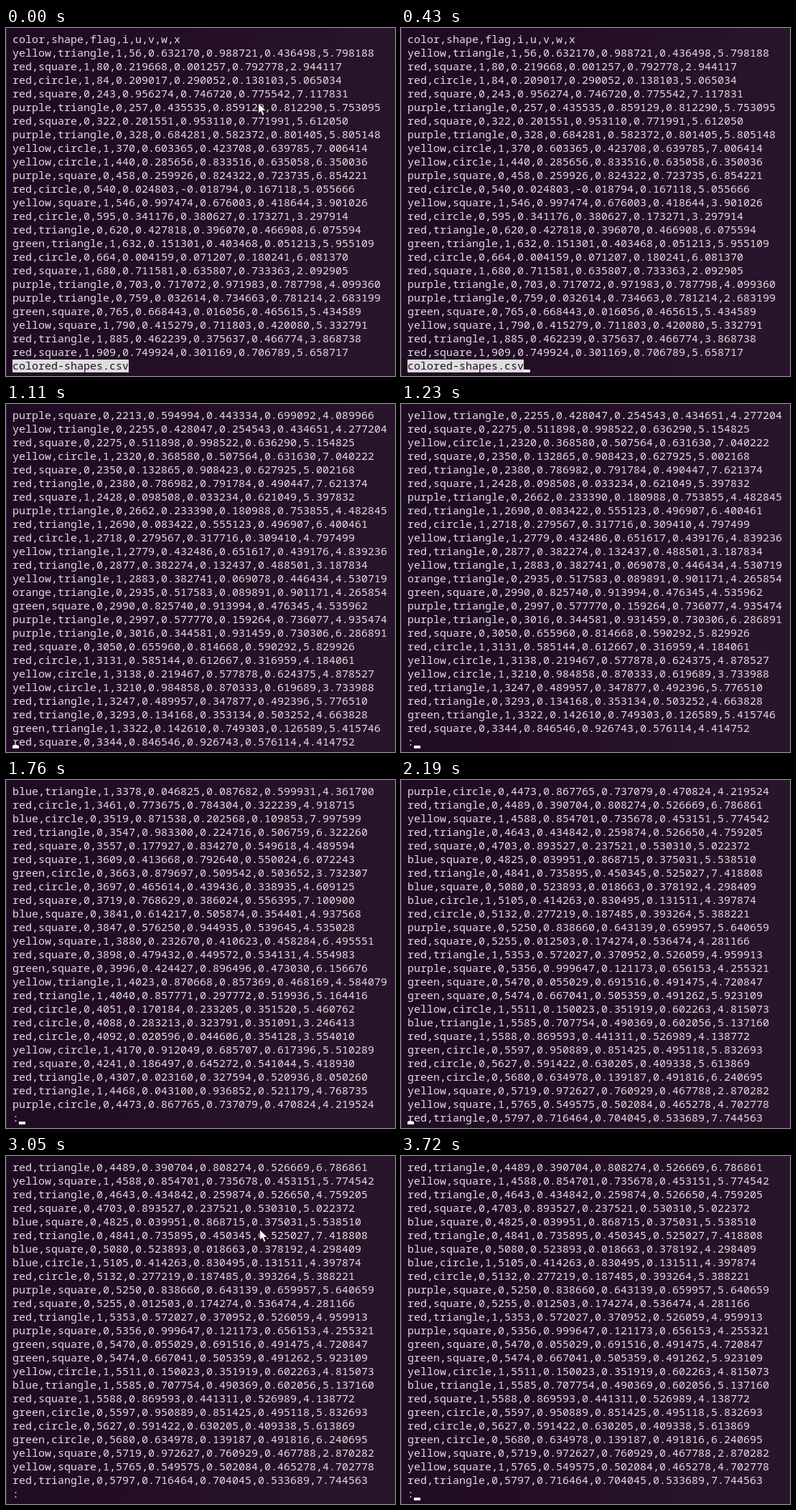
Animation of 542x486 px, one loop 3940 ms. Source, as an HTML page:

```html
<!DOCTYPE html>
<html lang="en">
<head>
<meta charset="utf-8">
<title>Paging through a CSV file</title>
<style>
html, body { margin: 0; width: 100%; height: 100%; overflow: hidden; background: #230f27; }
svg { display: block; }
text { font: 500 15px "Noto Sans Mono", "DejaVu Sans Mono", monospace; font-variant-ligatures: none; fill: #dedede; white-space: pre; }
#status.mark { fill: #210d25; }
</style>
</head>
<body>
<svg width="542" height="486" viewBox="0 0 542 486">
  <defs>
    <linearGradient id="bg" x2="1" y2="0.15">
      <stop offset="0" stop-color="#1e0a22"/>
      <stop offset="0.5" stop-color="#230e26"/>
      <stop offset="1" stop-color="#29152b"/>
    </linearGradient>
  </defs>
  <rect width="542" height="486" fill="url(#bg)"/>
  <rect width="1" height="486" fill="#3d3440"/>
  <g id="lines"></g>
  <rect id="bar" x="9" y="463" width="162" height="18" fill="#dedede"/>
  <text id="status" x="9" y="477"></text>
  <rect id="caret" y="477" width="9" height="4" fill="#fff"/>
  <path id="mouse" d="M.5 .8V15.5L4 12.3L6.4 18.3L9 17.2L6.6 11.5H11.3Z" fill="#fff" stroke="#111" stroke-width=".9"/>
</svg>
<script>
const rows = `color,shape,flag,i,u,v,w,x
yellow,triangle,1,56,0.632170,0.988721,0.436498,5.798188
red,square,1,80,0.219668,0.001257,0.792778,2.944117
red,circle,1,84,0.209017,0.290052,0.138103,5.065034
red,square,0,243,0.956274,0.746720,0.775542,7.117831
purple,triangle,0,257,0.435535,0.859129,0.812290,5.753095
red,square,0,322,0.201551,0.953110,0.771991,5.612050
purple,triangle,0,328,0.684281,0.582372,0.801405,5.805148
yellow,circle,1,370,0.603365,0.423708,0.639785,7.006414
yellow,circle,1,440,0.285656,0.833516,0.635058,6.350036
purple,square,0,458,0.259926,0.824322,0.723735,6.854221
red,circle,0,540,0.024803,-0.018794,0.167118,5.055666
yellow,square,1,546,0.997474,0.676003,0.418644,3.901026
red,circle,0,595,0.341176,0.380627,0.173271,3.297914
red,triangle,0,620,0.427818,0.396070,0.466908,6.075594
green,triangle,1,632,0.151301,0.403468,0.051213,5.955109
red,circle,0,664,0.004159,0.071207,0.180241,6.081370
red,square,1,680,0.711581,0.635807,0.733363,2.092905
purple,triangle,0,703,0.717072,0.971983,0.787798,4.099360
purple,triangle,0,759,0.032614,0.734663,0.781214,2.683199
green,square,0,765,0.668443,0.016056,0.465615,5.434589
yellow,square,1,790,0.415279,0.711803,0.420080,5.332791
red,triangle,1,885,0.462239,0.375637,0.466774,3.868738
red,square,1,909,0.749924,0.301169,0.706789,5.658717
red,square,0,1036,0.841873,0.682996,0.677797,6.429842
blue,circle,0,1075,0.780359,0.331467,0.042890,5.725366
blue,triangle,0,1105,0.441773,0.445977,0.632936,4.306461
yellow,triangle,1,1151,0.662341,0.139561,0.425316,7.420501
purple,square,0,1238,0.715707,0.305567,0.708221,6.278403
blue,circle,1,1410,0.410789,0.523766,0.043186,3.781430
green,triangle,0,1420,0.091844,0.497791,0.078476,5.171903
purple,circle,0,1573,0.997098,0.193719,0.466933,6.253743
red,circle,0,1590,0.380667,0.463909,0.241555,5.233591
blue,square,0,1604,0.656744,0.687258,0.312663,4.783385
blue,circle,1,1620,0.683139,0.516427,0.042795,6.430768
red,circle,0,1712,0.022581,0.072979,0.248205,4.881790
red,circle,0,1716,0.191098,0.092774,0.252170,6.343877
green,square,0,1782,0.767427,0.341579,0.457022,4.830320
yellow,triangle,1,1800,0.040595,0.121751,0.425269,6.189923
blue,square,1,1811,0.795653,0.652313,0.320033,4.072821
blue,triangle,0,1985,0.919101,0.834472,0.624437,2.490138
yellow,circle,1,1989,0.393196,0.782701,0.636692,4.529207
red,square,1,1995,0.597820,0.472722,0.649122,4.940941
yellow,triangle,1,2089,0.596878,0.918061,0.432459,6.365943
green,circle,1,2102,0.083514,0.545773,0.518673,5.084667
red,square,0,2134,0.187974,0.156189,0.647312,4.377289
purple,triangle,1,2176,0.553340,0.681953,0.766042,6.318450
purple,square,0,2213,0.594994,0.443334,0.699092,4.089966
yellow,triangle,0,2255,0.428047,0.254543,0.434651,4.277204
red,square,0,2275,0.511898,0.998522,0.636290,5.154825
yellow,circle,1,2320,0.368580,0.507564,0.631630,7.040222
red,square,0,2350,0.132865,0.908423,0.627925,5.002168
red,triangle,0,2380,0.786982,0.791784,0.490447,7.621374
red,square,1,2428,0.098508,0.033234,0.621049,5.397832
purple,triangle,0,2662,0.233390,0.180988,0.753855,4.482845
red,triangle,1,2690,0.083422,0.555123,0.496907,6.400461
red,circle,1,2718,0.279567,0.317716,0.309410,4.797499
yellow,triangle,1,2779,0.432486,0.651617,0.439176,4.839236
red,triangle,0,2877,0.382274,0.132437,0.488501,3.187834
yellow,triangle,1,2883,0.382741,0.069078,0.446434,4.530719
orange,triangle,0,2935,0.517583,0.089891,0.901171,4.265854
green,square,0,2990,0.825740,0.913994,0.476345,4.535962
purple,triangle,0,2997,0.577770,0.159264,0.736077,4.935474
purple,triangle,0,3016,0.344581,0.931459,0.730306,6.286891
red,square,0,3050,0.655960,0.814668,0.590292,5.829926
red,circle,1,3131,0.585144,0.612667,0.316959,4.184061
yellow,circle,1,3138,0.219467,0.577878,0.624375,4.878527
yellow,circle,1,3210,0.984858,0.870333,0.619689,3.733988
red,triangle,1,3247,0.489957,0.347877,0.492396,5.776510
red,triangle,0,3293,0.134168,0.353134,0.503252,4.663828
green,triangle,1,3322,0.142610,0.749303,0.126589,5.415746
red,square,0,3344,0.846546,0.926743,0.576114,4.414752
blue,triangle,1,3378,0.046825,0.087682,0.599931,4.361700
red,circle,1,3461,0.773675,0.784304,0.322239,4.918715
blue,circle,0,3519,0.871538,0.202568,0.109853,7.997599
red,triangle,0,3547,0.983300,0.224716,0.506759,6.322260
red,square,0,3557,0.177927,0.834270,0.549618,4.489594
red,square,1,3609,0.413668,0.792640,0.550024,6.072243
green,circle,0,3663,0.879697,0.509542,0.503652,3.732307
red,circle,0,3697,0.465614,0.439436,0.338935,4.609125
red,square,0,3719,0.768629,0.386024,0.556395,7.100900
blue,square,0,3841,0.614217,0.505874,0.354401,4.937568
red,square,0,3847,0.576250,0.944935,0.539645,4.535028
yellow,square,1,3880,0.232670,0.410623,0.458284,6.495551
red,square,0,3898,0.479432,0.449572,0.534131,4.554983
green,square,0,3996,0.424427,0.896496,0.473030,6.156676
yellow,triangle,1,4023,0.870668,0.857369,0.468169,4.584079
red,triangle,1,4040,0.857771,0.297772,0.519936,5.164416
red,circle,0,4051,0.170184,0.233205,0.351520,5.460762
red,circle,0,4088,0.283213,0.323791,0.351091,3.246413
red,circle,0,4092,0.020596,0.044606,0.354128,3.554010
yellow,circle,1,4170,0.912049,0.685707,0.617396,5.510289
red,square,0,4241,0.186497,0.645272,0.541044,5.418930
red,triangle,0,4307,0.023160,0.327594,0.520936,8.050260
red,triangle,1,4468,0.043100,0.936852,0.521179,4.768735
purple,circle,0,4473,0.867765,0.737079,0.470824,4.219524
red,triangle,0,4489,0.390704,0.808274,0.526669,6.786861
yellow,square,1,4588,0.854701,0.735678,0.453151,5.774542
red,triangle,0,4643,0.434842,0.259874,0.526650,4.759205
red,square,0,4703,0.893527,0.237521,0.530310,5.022372
blue,square,0,4825,0.039951,0.868715,0.375031,5.538510
red,triangle,0,4841,0.735895,0.450345,0.525027,7.418808
blue,square,0,5080,0.523893,0.018663,0.378192,4.298409
blue,circle,1,5105,0.414263,0.830495,0.131511,4.397874
red,circle,0,5132,0.277219,0.187485,0.393264,5.388221
purple,square,0,5250,0.838660,0.643139,0.659957,5.640659
red,square,0,5255,0.012503,0.174274,0.536474,4.281166
red,triangle,1,5353,0.572027,0.370952,0.526059,4.959913
purple,square,0,5356,0.999647,0.121173,0.656153,4.255321
green,square,0,5470,0.055029,0.691516,0.491475,4.720847
green,square,0,5474,0.667041,0.505359,0.491262,5.923109
yellow,circle,1,5511,0.150023,0.351919,0.602263,4.815073
blue,triangle,1,5585,0.707754,0.490369,0.602056,5.137160
red,square,1,5588,0.869593,0.441311,0.526989,4.138772
green,circle,0,5597,0.950889,0.851425,0.495118,5.832693
red,circle,0,5627,0.591422,0.630205,0.409338,5.613869
green,circle,0,5680,0.634978,0.139187,0.491816,6.240695
yellow,square,0,5719,0.972627,0.760929,0.467788,2.870282
yellow,square,1,5765,0.549575,0.502084,0.465278,4.702778
red,triangle,0,5797,0.716464,0.704045,0.533689,7.744563`.split("\n");

const LOOP = 3940, PAGE = 24, CELL = 9, ROW = 19;
const get = id => document.getElementById(id);
const [lines, bar, status, caret, mouse] = ["lines", "bar", "status", "caret", "mouse"].map(get);

// [start ms, first row, bottom line]; an empty bottom line shows one more row mid-scroll
const screens = [
  [0, 0, "colored-shapes.csv"],
  [580, 24, ":"],
  [1110, 47, ""],
  [1230, 48, ":"],
  [1760, 72, ":"],
  [2190, 95, ""],
  [2340, 96, ":"]
];
// [start ms, x, y]; no position means hidden
const pointer = [
  [0, 351, 104], [430],
  [3050, 353, 102], [3180, 432, 244], [3300, 509, 396],
  [3450, 530, 461], [3600, 523, 474], [3720]
];

const labels = Array.from({ length: PAGE + 1 }, (_, i) => {
  const label = document.createElementNS("http://www.w3.org/2000/svg", "text");
  label.setAttribute("x", CELL);
  label.setAttribute("y", 21 + i * ROW);
  return lines.appendChild(label);
});

const at = (steps, t) => steps.findLast(step => step[0] <= t);
const show = (el, on) => el.setAttribute("visibility", on ? "visible" : "hidden");
let current;

function drawScreen(screen) {
  const [, first, bottom] = current = screen;
  const count = bottom ? PAGE : PAGE + 1;
  labels.forEach((label, i) => label.textContent = i < count ? rows[first + i] : "");
  status.textContent = bottom;
  status.classList.toggle("mark", first === 0);
  show(bar, first === 0);
  caret.setAttribute("x", CELL * (1 + bottom.length));
}

function draw(t) {
  const screen = at(screens, t);
  if (screen !== current) drawScreen(screen);
  show(caret, t >= 120 && !(t >= 2930 && t < 3450));
  const [, x, y] = at(pointer, t);
  show(mouse, x !== undefined);
  if (x !== undefined) mouse.setAttribute("transform", `translate(${x} ${y})`);
}

function tick() {
  draw(performance.now() % LOOP);
  requestAnimationFrame(tick);
}
tick();
</script>
</body>
</html>
```
